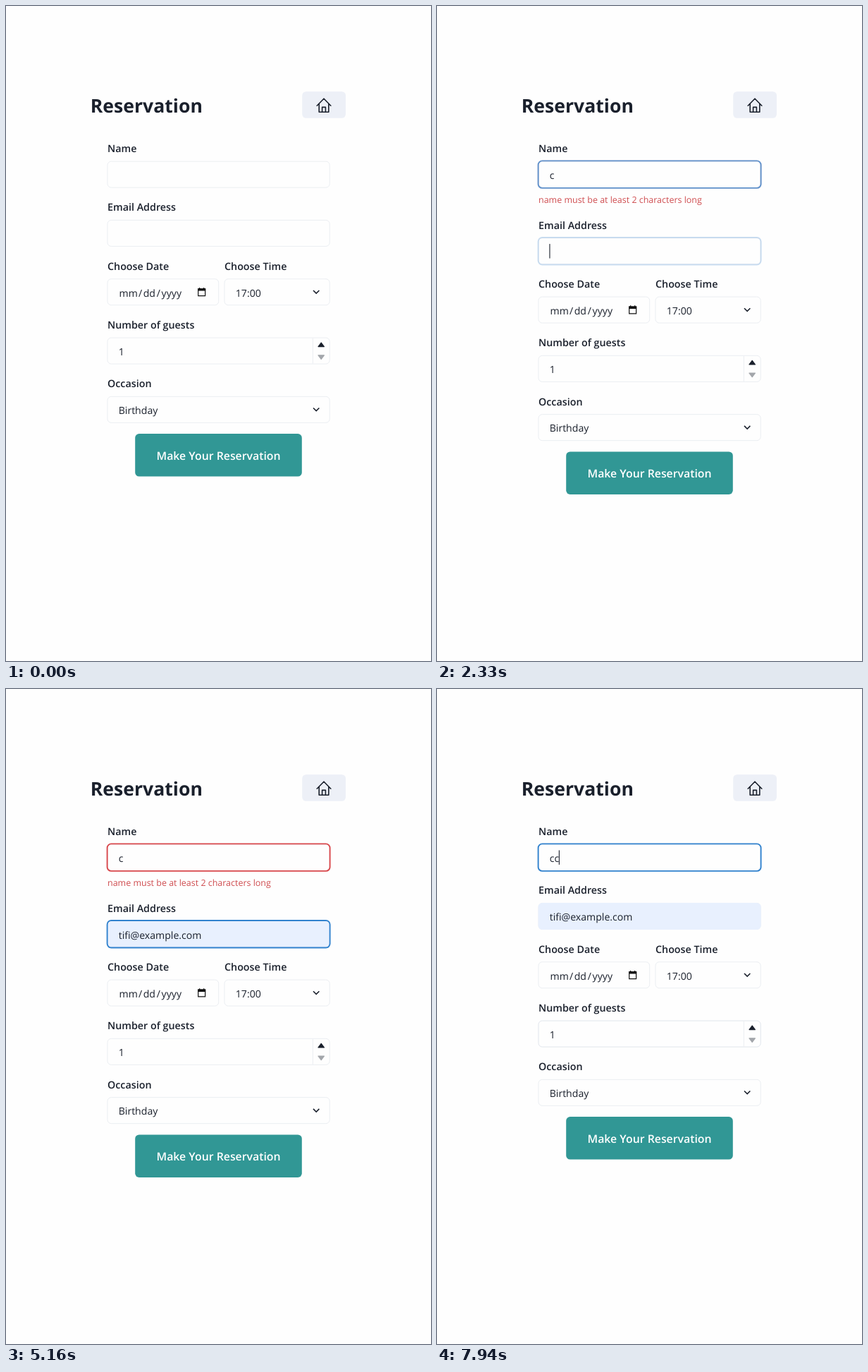
An HTML page for the animation above (8000 ms loop, 603x928 px).

```html
<!DOCTYPE html>
<html lang="en">
<head>
<meta charset="utf-8">
<title>Reservation form</title>
<style>
  html, body { margin: 0; width: 100%; height: 100%; overflow: hidden; background: #fefefe; }
  svg { display: block; width: 100vw; height: 100vh; }
  text { font: 400 14.1px "Open Sans", "Noto Sans", sans-serif; fill: #1a202c; text-rendering: geometricPrecision; white-space: pre; }
  .title { font-size: 26.6px; font-weight: 700; }
  .label { font-size: 14.3px; font-weight: 600; }
  .submit { font-size: 15.85px; font-weight: 600; fill: #fff; text-anchor: middle; }
  .error { font-size: 12.47px; fill: #cf4d50; }
  .preview { font: 12.6px "Liberation Sans", Arial, sans-serif; }
  .box { fill: none; stroke: #ebeef2; stroke-width: 1; }
  .ring { fill: none; stroke-width: 1.9; }
  .blue { stroke: #3182ce; }
  .red { stroke: #d9484c; }
  .line { fill: none; stroke: #1a202c; stroke-width: 1.6; stroke-linejoin: round; stroke-linecap: round; }
</style>
</head>
<body>
<svg id="stage" viewBox="0 0 603 928"></svg>
<script>
const LOOP = 8000;
const LEFT = 144, RIGHT = 459.2, TEXT_X = 159.7;
const TOP = 219.7, PITCH = 83.3, HEIGHT = 37.9, ERROR_SHIFT = 25.3;
const EMAIL = "tifi@example.com";

const stage = document.getElementById("stage");

function add(parent, tag, attrs = {}, content = "") {
  const el = document.createElementNS("http://www.w3.org/2000/svg", tag);
  for (const key in attrs) el.setAttribute(key, attrs[key]);
  el.textContent = content;
  parent.appendChild(el);
  return el;
}
const write = (parent, x, y, content, cls = "") => add(parent, "text", { x, y, class: cls }, content);
const rowTop = row => TOP + PITCH * row;
const baseline = row => rowTop(row) + HEIGHT / 2 + 6.3;

function label(parent, row, content, x = LEFT) {
  write(parent, x, rowTop(row) - 12.6, content, "label");
}
function box(parent, row, x = LEFT, right = RIGHT) {
  return add(parent, "rect", { x, y: rowTop(row) + .45, width: right - x, height: 37, rx: 5.3, class: "box" });
}
function ring(parent, row, color) {
  return add(parent, "rect", {
    x: LEFT - .4, y: rowTop(row) - .3, width: RIGHT - LEFT + .8, height: 38.5, rx: 5.7, class: "ring " + color
  });
}
function chevron(parent, row) {
  add(parent, "path", {
    d: "M16.59 8.59L12 13.17 7.41 8.59 6 10l6 6 6-6z", fill: "#1a202c",
    transform: `translate(430.7 ${rowTop(row) + 9.3}) scale(.79)`
  });
}
function triangle(parent, y, dir, color) {
  add(parent, "path", {
    d: `M443 ${y}h8.4l-4.2 ${-5.6 * dir}z`, fill: color, stroke: color, "stroke-width": 1.2, "stroke-linejoin": "round"
  });
}

// Header
write(stage, 119.8, 151, "Reservation", "title");
add(stage, "rect", { x: 420.2, y: 121.2, width: 61.8, height: 37.6, rx: 5.7, fill: "#edf0f7" });
add(stage, "path", {
  d: "M441.2 141.2L451 131.2L460.8 141.2M444.2 138.6V150.2H457.8V138.6M448.6 150.2V143.4H453.4V150.2", class: "line"
});

// Name
label(stage, 0, "Name");
box(stage, 0);
const nameText = write(stage, TEXT_X, baseline(0), "");
const nameRed = ring(stage, 0, "red");
const nameBlue = ring(stage, 0, "blue");
const error = write(stage, LEFT, 279.4, "name must be at least 2 characters long", "error");

// Everything below the name field moves with the error message
const form = add(stage, "g");
label(form, 1, "Email Address");
const emailBox = box(form, 1);
const emailFill = add(form, "rect", {
  x: LEFT - .4, y: rowTop(1), width: RIGHT - LEFT + .8, height: HEIGHT, rx: 5.7, fill: "#e8f0fe"
});
const emailText = write(form, TEXT_X, baseline(1), "");
const emailBlue = ring(form, 1, "blue");

label(form, 2, "Choose Date");
label(form, 2, "Choose Time", 310);
box(form, 2, LEFT, 301.7);
box(form, 2, 310);
[["mm", 160.6], ["/", 188], ["dd", 194.7], ["/", 213.7], ["yyyy", 220.6]]
  .forEach(([part, x]) => write(form, x, baseline(2), part));
add(form, "path", { d: "M272.7 400.9H282.6V410.6H272.7Z", fill: "none", stroke: "#111", "stroke-width": 1.2 });
add(form, "path", { d: "M272.1 400.3H283.2V403.6H272.1ZM274 399H275.3V401H274ZM280 399H281.3V401H280Z", fill: "#111" });
write(form, 325.8, baseline(2), "17:00");
chevron(form, 2);

label(form, 3, "Number of guests");
const guestBox = box(form, 3);
add(form, "path", { d: `M435.3 ${rowTop(3) + 1}v36`, class: "box" });
write(form, TEXT_X, baseline(3), "1");
triangle(form, 482.6, 1, "#1a202c");
triangle(form, 494.8, -1, "#a3a6ab");

label(form, 4, "Occasion");
box(form, 4);
write(form, TEXT_X, baseline(4), "Birthday");
chevron(form, 4);

add(form, "rect", { x: 183.2, y: 606.1, width: 236.6, height: 60.5, rx: 5.7, fill: "#319795" });
write(form, 301.6, 643.2, "Make Your Reservation", "submit");

const caret = add(stage, "rect", { width: 1.1, height: 20.4, fill: "#1a202c" });
const pointer = add(stage, "path", {
  d: "M.5 .5V14.2L3.7 11.3L5.9 16.3L8 15.4L5.9 10.5H10.3Z", fill: "#fff", stroke: "#000", "stroke-width": .9
});

const within = (t, from, to) => t >= from && t < to;
const show = (el, on) => el.setAttribute("visibility", on ? "visible" : "hidden");
const fade = (t, start) => Math.min(1, Math.max(0, (t - start + 50) / 210));
const during = (t, from, to) => fade(t, from) - fade(t, to);

// Pointer strokes as [time, x, y] points; each stays 80 ms after its last point
const strokes = [
  [[320, 471, 393], [560, 285, 315], [800, 67, 198], [1120, 216, 223]],
  [[4930, 262, 325], [5080, 226, 282]],
  [[5650, 273, 405], [6120, 254, 285]]
];

function pointerAt(t) {
  const path = strokes.find(p => within(t, p[0][0], p[p.length - 1][0] + 80));
  if (!path) return null;
  const start = path[0][0];
  const at = start + Math.floor((t - start) / 80) * 80;
  for (let i = 1; i < path.length; i++) {
    const [t0, x0, y0] = path[i - 1], [t1, x1, y1] = path[i];
    if (at <= t1) {
      const u = (at - t0) / (t1 - t0);
      return [x0 + (x1 - x0) * u, y0 + (y1 - y0) * u];
    }
  }
  return path[path.length - 1].slice(1);
}

// [from, to, focused row]
const caretOn = [
  [1360, 2330, 0], [2330, 2880, 1], [3380, 3790, 1], [4600, 5160, 1],
  [5650, 6200, 1], [6440, 7390, 0], [7940, 8000, 0]
];

function render(t) {
  const hasError = within(t, 2330, 6920);
  const shift = hasError ? ERROR_SHIFT : 0;
  form.setAttribute("transform", `translate(0 ${shift})`);
  show(error, hasError);

  nameText.textContent = t < 1850 ? "" : t < 6920 ? "c" : "cc";
  nameBlue.setAttribute("opacity", during(t, 1360, 2330) + fade(t, 6440));
  nameRed.setAttribute("opacity", during(t, 2330, 6440));

  const preview = within(t, 3790, 4600);
  emailText.textContent = t < 3460 ? "" : t < 3790 ? "c" : EMAIL;
  emailText.setAttribute("class", preview ? "preview" : "");
  emailText.setAttribute("y", baseline(1) - (preview ? .4 : 0));
  show(emailFill, t >= 3790);
  emailBlue.setAttribute("opacity", during(t, 2330, 6440));

  emailBox.style.stroke = within(t, 640, 2330) ? "#e0e5ec" : "";
  guestBox.style.stroke = t >= 6920 ? "#e0e5ec" : "";

  const blink = caretOn.find(([from, to]) => within(t, from, to));
  show(caret, blink);
  if (blink) {
    const row = blink[2];
    const field = row ? emailText : nameText;
    const width = field.textContent ? field.getComputedTextLength() : 0;
    caret.setAttribute("x", TEXT_X + width - .3);
    caret.setAttribute("y", rowTop(row) + 8.8 + (row ? shift : 0));
  }

  const pos = pointerAt(t);
  show(pointer, pos);
  if (pos) pointer.setAttribute("transform", `translate(${pos[0]} ${pos[1]})`);
}

const begin = performance.now();
function tick() {
  render((performance.now() - begin) % LOOP);
  requestAnimationFrame(tick);
}
tick();
</script>
</body>
</html>
```
